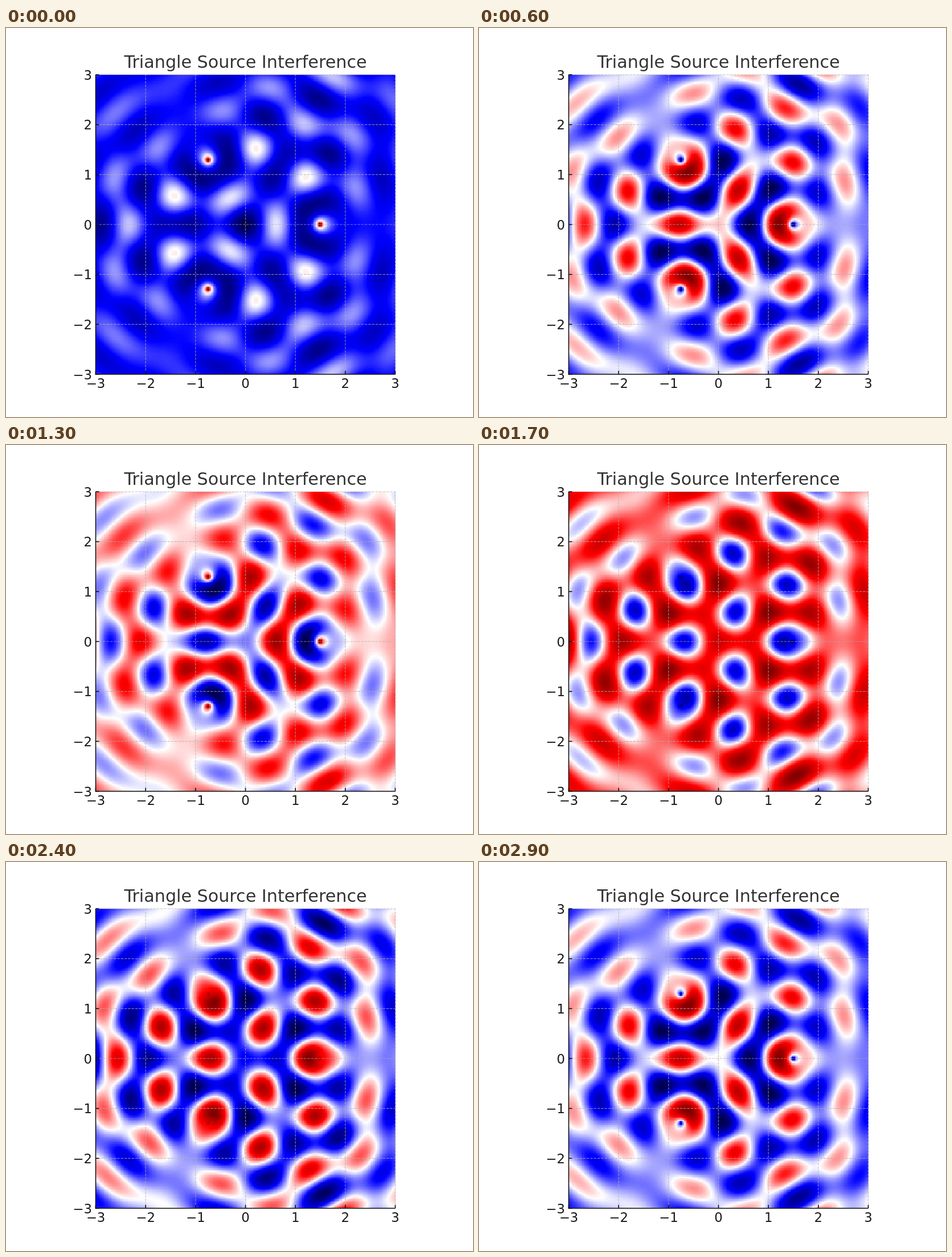
An HTML page with a canvas that plays this animation: 820x683 px, repeating every 3 s.

```html
<!DOCTYPE html>
<html lang="en">
<head>
<meta charset="utf-8">
<title>Triangle Source Interference</title>
<style>
  html, body { margin: 0; width: 100%; height: 100%; overflow: hidden; background: #fff; }
  canvas { display: block; }
</style>
</head>
<body>
<canvas id="stage" width="820" height="683"></canvas>
<script>
const N = 200, FRAMES = 30, FRAME_MS = 100;
const LEFT = 157.5, TOP = 82, SIZE = 526, UNIT = SIZE / 6;
const K = 2 * Math.PI;
const STEP = K * 2 * Math.PI / (FRAMES - 1);
const FONT = '"DejaVu Sans", sans-serif';

const ctx = document.getElementById('stage').getContext('2d');
const field = document.createElement('canvas');
field.width = field.height = N;
const fieldCtx = field.getContext('2d');
const image = fieldCtx.createImageData(N, N);
const pixels = new Uint32Array(image.data.buffer);

// Diverging colour ramp: navy, blue, white, red, dark red
const stops = [[0, 0, 0.3], [0, 0, 1], [1, 1, 1], [1, 0, 0], [0.5, 0, 0]];
const ramp = Uint32Array.from({ length: 256 }, (_, i) => {
  const p = i / 255 * 4, s = Math.min(3, Math.floor(p));
  const [r, g, b] = stops[s].map((c, j) => Math.round(255 * (c + (stops[s + 1][j] - c) * (p - s))));
  return (255 << 24 | b << 16 | g << 8 | r) >>> 0;
});

// Sum of cos(kr - wt) / sqrt(r), split into its cosine and sine parts
const sources = [0, 1, 2].map(i => {
  const a = i * 2 * Math.PI / 3;
  return [1.5 * Math.cos(a), 1.5 * Math.sin(a)];
});
const cosPart = new Float64Array(N * N), sinPart = new Float64Array(N * N);
const coord = i => -3 + 6 * i / (N - 1);
for (let row = 0; row < N; row++) {
  for (let col = 0; col < N; col++) {
    const i = row * N + col;
    for (const [sx, sy] of sources) {
      const r = Math.hypot(coord(col) - sx, coord(row) - sy);
      const amp = 1 / Math.sqrt(r + 1e-6);
      cosPart[i] += amp * Math.cos(K * r);
      sinPart[i] += amp * Math.sin(K * r);
    }
  }
}

const values = new Float64Array(N * N);
function drawField(phase) {
  const c = Math.cos(phase), s = Math.sin(phase);
  let min = Infinity, max = -Infinity;
  for (let i = 0; i < values.length; i++) {
    const v = values[i] = cosPart[i] * c + sinPart[i] * s;
    if (v < min) min = v;
    if (v > max) max = v;
  }
  const scale = 256 / (max - min);
  for (let i = 0; i < values.length; i++) {
    pixels[i] = ramp[Math.min(255, Math.floor((values[i] - min) * scale))];
  }
  fieldCtx.putImageData(image, 0, 0);
  ctx.imageSmoothingEnabled = false;
  ctx.drawImage(field, LEFT, TOP, SIZE, SIZE);
}

function line(x1, y1, x2, y2) {
  ctx.beginPath();
  ctx.moveTo(x1, y1);
  ctx.lineTo(x2, y2);
  ctx.stroke();
}

function drawAxes() {
  const right = LEFT + SIZE, bottom = TOP + SIZE;
  const px = v => LEFT + (v + 3) * UNIT;
  const py = v => TOP + (3 - v) * UNIT;

  ctx.strokeStyle = 'rgba(176, 176, 176, 0.7)';
  ctx.lineWidth = 1.2;
  ctx.setLineDash([4.4, 1.9]);
  for (let v = -3; v <= 3; v++) {
    line(px(v), bottom, px(v), TOP);
    line(LEFT, py(v), right, py(v));
  }

  ctx.setLineDash([]);
  ctx.strokeStyle = '#111';
  ctx.lineWidth = 1.6;
  line(LEFT, TOP, LEFT, bottom + 0.8);
  line(LEFT - 0.8, bottom, right, bottom);

  ctx.fillStyle = '#1a1a1a';
  ctx.font = '22.8px ' + FONT;
  for (let v = -3; v <= 3; v++) {
    const label = String(v).replace('-', '\u2212');
    line(px(v), bottom, px(v), bottom - 6);
    line(LEFT, py(v), LEFT + 6, py(v));
    ctx.textAlign = 'center';
    ctx.fillText(label, px(v), 632.3);
    ctx.textAlign = 'right';
    ctx.fillText(label, LEFT - 6.6, py(v) + 8.6);
  }

  ctx.fillStyle = '#333';
  ctx.font = '30.2px ' + FONT;
  ctx.textAlign = 'center';
  ctx.fillText('Triangle Source Interference', 420.5, 70);
}

let shown = -1;
function draw(frame) {
  if (frame === shown) return;
  shown = frame;
  ctx.fillStyle = '#fff';
  ctx.fillRect(0, 0, 820, 683);
  drawField(frame * STEP);
  drawAxes();
}

const start = performance.now();
function tick() {
  draw(Math.floor((performance.now() - start) / FRAME_MS) % FRAMES);
  requestAnimationFrame(tick);
}
tick();
</script>
</body>
</html>
```
